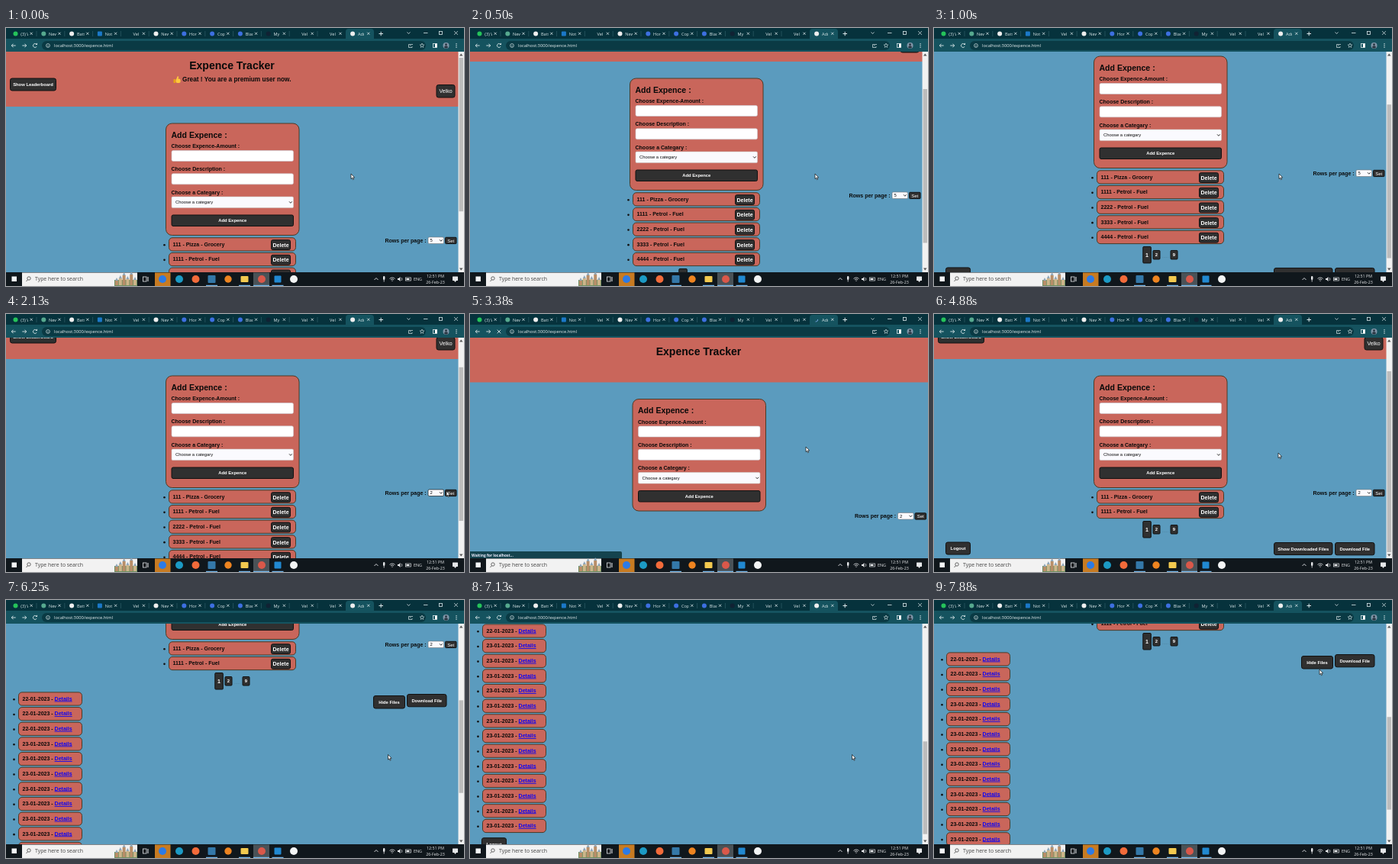
An HTML page with a canvas for the animation above (8000 ms loop, 600 by 338 pixels).

```html
<!DOCTYPE html>
<html lang="en">
<head>
<meta charset="utf-8">
<title>Expence Tracker</title>
<style>
html, body { margin: 0; width: 100%; height: 100%; overflow: hidden; background: #5b9bbe; }
canvas { display: block; width: 600px; height: 338px; }
</style>
</head>
<body>
<canvas id="stage" width="600" height="338"></canvas>
<script>
const c = document.getElementById('stage').getContext('2d');
const SANS = '"Liberation Sans", Arial, sans-serif', UI = '"Open Sans", sans-serif';
const RED = '#c9665b', BLUE = '#5b9bbe', DARK = '#303030', EDGE = '#4c3a26';
const LOOP = 8000, STEP = 125, TOP = 31, BOTTOM = 320;

// [time, value...]; equal times make a hard jump
const scrollKeys = [
  [125, 0], [500, 59], [750, 88], [1000, 88], [1250, 44], [3125, 44], [3125, 0],
  [4625, 0], [4875, 44], [5500, 44], [6250, 220], [6375, 220], [6750, 361],
  [7000, 361], [7875, 272]];
const mouseKeys = [
  [1125, 452, 191], [1500, 564, 234], [1875, 564, 234], [2125, 577, 232], [2625, 581, 234],
  [3250, 440, 174], [3625, 440, 174], [4000, 451, 182], [4875, 451, 182], [5250, 484, 305],
  [5500, 484, 305], [6250, 500.5, 202.5], [7250, 500.5, 202.5], [7875, 505, 91]];

function at(keys, t) {
  let i = keys.length - 1;
  while (i > 0 && keys[i][0] > t) i--;
  const a = keys[i], b = keys[i + 1] || a;
  const k = b[0] > a[0] ? Math.min(1, Math.max(0, (t - a[0]) / (b[0] - a[0]))) : 0;
  return a.slice(1).map((v, n) => v + (b[n + 1] - v) * k);
}

function box(x, y, w, h, r, fill, edge, line = 1) {
  c.beginPath();
  c.roundRect(x, y, w, h, r);
  c.fillStyle = fill;
  c.fill();
  if (edge) { c.strokeStyle = edge; c.lineWidth = line; c.stroke(); }
}
function dot(x, y, r, fill) {
  c.beginPath();
  c.arc(x, y, r, 0, 7);
  c.fillStyle = fill;
  c.fill();
}
function path(points, color, line = 1) {
  c.beginPath();
  for (let i = 0; i < points.length; i += 2) c.lineTo(points[i], points[i + 1]);
  c.strokeStyle = color;
  c.lineWidth = line;
  c.stroke();
}
function poly(points, fill) {
  c.beginPath();
  for (let i = 0; i < points.length; i += 2) c.lineTo(points[i], points[i + 1]);
  c.fillStyle = fill;
  c.fill();
}
function cross(x, y, r, color, line) {
  path([x - r, y - r, x + r, y + r], color, line);
  path([x - r, y + r, x + r, y - r], color, line);
}
// y is the middle of the capitals
function text(s, x, y, size, { color = '#0a0a0a', bold = 1, align = 'left', font = SANS } = {}) {
  c.font = `${bold ? 'bold ' : ''}${size}px ${font}`;
  c.textAlign = align;
  c.fillStyle = color;
  c.fillText(s, x, y + size * .36);
}
function button(s, x, y, w, h, size = 5.86, bold = 1, r = 2.5) {
  box(x, y, w, h, r, DARK, '#111');
  text(s, x + w / 2, y + h / 2, size, { color: '#fff', bold, align: 'center' });
}
function select(s, x, y, w, h, pad, edge = '#777') {
  box(x, y, w, h, 1.5, '#fafafe', edge, .6);
  text(s, x + pad, y + h / 2, 5.86, { bold: 0 });
  const m = y + h / 2;
  path([x + w - 5.5, m - 1, x + w - 3.7, m + 1, x + w - 1.9, m - 1], '#222', .9);
}
function row(x, y, w) {
  dot(x - 6, y + 1, 1.3, '#111');
  box(x, y - 8.4, w, 17.2, 4.5, RED, EDGE);
}

function form() {
  box(209.5, 125, 174.5, 146.5, 8, RED, EDGE);
  text('Add Expence :', 216.5, 140, 10.54);
  ['Choose Expence-Amount :', 'Choose Description :', 'Choose a Categary :'].forEach((s, i) => {
    const y = 160.5 + i * 30.3;
    text(s, 216.5, y - 6, 7.03);
    if (i < 2) box(217, y, 159.5, 14, 2, '#fff', '#c9c9d2', .6);
    else select('Choose a categary', 217, y, 159.5, 14.5, 5, '#ccc');
  });
  button('Add Expence', 217, 245, 159.5, 14.5, 5.86, 1, 2);
}

function page(t, scroll) {
  const loading = t >= 3125 && t < 3625, five = t < 3125, files = t >= 5500;
  const dx = loading ? 3.5 : 0, dy = loading ? -13.5 : 0;
  c.save();
  c.beginPath();
  c.rect(0, TOP, 600, BOTTOM - TOP);
  c.clip();
  c.fillStyle = BLUE;
  c.fillRect(0, TOP, 600, BOTTOM - TOP);
  c.translate(0, -scroll);

  box(0, TOP, 600, 72 + dy, 0, RED);
  text('Expence Tracker', 296 + dx, 49, 14.05, { align: 'center' });
  if (!loading) {
    box(219.5, 67, 2.5, 5, .5, '#e8a317');
    box(222.5, 66.5, 6, 5.5, 1.8, '#ffc83d');
    path([224, 67.5, 225.5, 63.5], '#ffc83d', 2);
    text('Great ! You are a premium user now.', 231, 67.5, 8.22);
    button('Show Leaderboard', 5.5, 66, 60, 16);
    button('Velko', 564, 74.5, 24, 16.5, 7.03, 0);
  }

  c.save();
  c.translate(dx, dy);
  form();
  c.translate(dx && 4, 0);
  text('Rows per page :', 496.5, 278, 7.03);
  select(t < 1750 ? '5' : '2', 553, 274, 20.5, 8.5, 2.5, t >= 1500 && five ? '#000' : '#777');
  button('Set', 575.5, 274.3, 14.5, 8.3, 5.86, 0, 1);
  c.restore();

  const rows = five ? 5 : 2, pitch = 19.65, shift = (rows - 2) * pitch;
  const bottom = (files ? 668 : 351) + shift;
  if (!loading) {
    ['111 - Pizza - Grocery', '1111 - Petrol - Fuel', '2222 - Petrol - Fuel',
     '3333 - Petrol - Fuel', '4444 - Petrol - Fuel'].slice(0, rows).forEach((s, i) => {
      const y = 283.2 + i * pitch;
      row(213.5, y, 166);
      text(s, 218.5, y, 7.03);
      button('Delete', 347.5, y - 5.5, 25, 12.8, 7.03, 1, 2);
    });
    button('1', 273.8, 315.5 + shift, 10.5, 21.5, 7, 1, 1);
    button('2', 287, 320.5 + shift, 9, 11.5, 5.86, 1, 1);
    text('.....', 303, 328 + shift, 5.86, { color: '#48748c', bold: 0, align: 'center' });
    button('9', 310, 320.5 + shift, 9, 11.5, 5.86, 1, 1);
    for (let i = 0; files && i < 16; i++) {
      const y = 349.3 + i * pitch, s = `${i < 3 ? 22 : 23}-01-2023 - `;
      row(16.5, y, 83);
      text(s, 21.5, y, 7.03);
      const x = 21.5 + c.measureText(s).width;
      text('Details', x, y, 7.03, { color: '#1408ee' });
      path([x, y + 3.6, x + c.measureText('Details').width, y + 3.6], '#1408ee', .9);
    }
    button('Logout', 15.5, bottom - 8, 32, 16);
    if (files) button('Hide Files', 481.5, 345.5, 41, 16.5);
    else button('Show Downloaded Files', 445.5, 343.5 + shift, 76.5, 16);
    button('Download File', 525.5, 343.5 + shift, 51.5, 16.3);
  }
  c.restore();

  if (loading) {
    box(0, 311, 199, 10, [0, 2, 0, 0], '#15434e');
    text('Waiting for localhost...', 2, 316, 4.9, { color: '#eef', font: UI });
  } else {
    const k = 273 / (bottom + 13 - TOP);
    box(592.5, TOP, 7.5, 289, 0, '#f1f1f1');
    box(593.5, 39 + scroll * k, 5.5, 289 * k, 0, '#bcbcbc');
    poly([594, 36.5, 598.5, 36.5, 596.2, 33.5], '#555');
    poly([594, 314.5, 598.5, 314.5, 596.2, 317.5], '#555');
  }
}

const tabs = [
  ['(3) W', '#25c35a'], ['New', '#56a98e'], ['Batt', '#eee'], ['Not', '#1b78c8', 1],
  ['Vel'], ['New', '#eee'], ['Hor', '#3d6fe0'], ['Cop', '#3d6fe0'], ['Blac', '#3d6fe0'],
  ['My', '#123'], ['Vel'], ['Vel'], ['Adı', '#eee']];

function browser(t) {
  const pale = '#dbe8ea', loading = t >= 3125 && t < 3625;
  box(0, 0, 600, 15, 0, '#06323c');
  box(0, 14, 600, 17, 0, '#15535f');
  box(445, 1, 37, 14, [4, 4, 0, 0], '#15535f');
  tabs.forEach(([s, color, square], i) => {
    const x = 12.5 + i * 36.8;
    if (loading && i === 12) {
      c.beginPath();
      c.arc(x - 1, 7.5, 2.5, t / 90, t / 90 + 2);
      c.strokeStyle = '#8ab4f8';
      c.lineWidth = .8;
      c.stroke();
    } else if (square) box(x - 3, 4.5, 6, 6, 1, color);
    else if (color) dot(x, 7.5, 3, color);
    c.save();
    c.beginPath();
    c.rect(x + 6, 0, 10.5, 15);
    c.clip();
    text(s, x + 6.8, 7.5, 5.6, { color: pale, bold: 0, font: UI });
    c.restore();
    cross(x + 20.7, 7.3, 1.6, pale, .8);
    if (i < 11) path([x + 27.5, 4, x + 27.5, 11], '#41707a', .5);
  });
  path([488.5, 7.5, 494, 7.5], pale);
  path([491.2, 4.8, 491.2, 10.2], pale);
  path([525.5, 5.5, 527.5, 7.5, 529.5, 5.5], pale, .8);
  path([547, 6.5, 552.5, 6.5], pale, .8);
  c.strokeRect(567.5, 4.5, 4, 4);
  cross(589.5, 6.5, 2.3, pale, .8);

  for (const [x, d] of [[10, -1], [24, 1]]) {
    path([x - 2.7, 23, x + 2.7, 23], pale, .9);
    path([x + d * .5, 20.7, x + d * 2.7, 23, x + d * .5, 25.3], pale, .9);
  }
  if (loading) cross(38, 23, 2.3, pale, .9);
  else {
    c.beginPath();
    c.arc(38, 23, 2.5, .5, 5.5);
    c.strokeStyle = pale;
    c.lineWidth = .9;
    c.stroke();
    poly([38.6, 22, 41, 22, 41, 19.5], pale);
  }
  box(47, 17, 503, 12, 6, '#0a3a44');
  c.beginPath();
  c.arc(55, 23, 2.4, 0, 7);
  c.strokeStyle = pale;
  c.lineWidth = .7;
  c.stroke();
  path([55, 22.6, 55, 24.4], pale, .7);
  text('localhost:3000/expence.html', 63, 22.8, 5.75, { color: '#e9f1f2', bold: 0, font: UI });
  path([530, 21.5, 527.5, 21.5, 527.5, 25.5, 532, 25.5, 532, 24], pale, .7);
  path([529.5, 23.5, 530.5, 21.5, 533, 21.5], pale, .7);
  const star = [];
  for (let i = 0; i <= 10; i++) {
    const r = i % 2 ? 1.3 : 3, a = i * Math.PI / 5;
    star.push(545 + r * Math.sin(a), 23 - r * Math.cos(a));
  }
  path(star, pale, .6);
  c.lineWidth = .8;
  c.strokeRect(559.5, 20.5, 5, 5);
  box(562, 20.5, 2.5, 5, 0, '#fff');
  dot(576.5, 23, 4, '#8196a8');
  dot(576.5, 21.7, 1.4, '#273440');
  box(574.3, 23.5, 4.4, 3, 1.3, '#273440');
  for (const y of [20.7, 23, 25.3]) dot(590, y, .7, pale);
}

function taskbar() {
  const pale = '#e6e8ea', grey = '#444';
  box(0, 320, 600, 18, 0, '#10171c');
  box(7.5, 325.5, 6.5, 6.5, 0, '#f4f6f8');
  box(21, 320.5, 151, 17.5, 0, '#f2f2f2');
  c.beginPath();
  c.arc(30, 328, 2.2, 0, 7);
  c.strokeStyle = grey;
  c.lineWidth = .8;
  c.stroke();
  path([28.5, 329.7, 26.5, 332], grey, .8);
  text('Type here to search', 38, 329, 6.9, { color: grey, bold: 0, font: UI });
  box(142, 330, 30, 8, 0, '#6e8f63');
  for (let i = 0; i < 6; i++) {
    const x = 143 + i * 4.8, h = [6, 9, 13, 8, 14, 7][i];
    box(x, 337 - h, 4, h, 0, i % 2 ? '#cdb58a' : '#b88e68');
    poly([x, 337 - h, x + 2, 333 - h, x + 4, 337 - h], '#8ea6b8');
  }
  c.strokeStyle = pale;
  c.lineWidth = .8;
  c.strokeRect(179.5, 326, 4.5, 6);
  path([186, 326, 186, 332], pale);
  box(195, 320.5, 20.5, 17.5, 0, '#c77b22');
  dot(205, 329, 5, '#2d7be5');
  box(324, 320.5, 21, 17.5, 0, '#4a5257');
  dot(227, 329, 5, '#1c9ac4');
  dot(248.5, 329, 5, '#f26b3a');
  box(264.5, 324, 10, 10, 1, '#3478a8');
  dot(291, 329, 4.7, '#ee8420');
  box(307.5, 325, 10, 8, 1, '#f2c94f');
  dot(335, 329, 5, '#d9584a');
  box(351.5, 324.5, 9, 9, 1, '#2189d1');
  dot(377, 329, 5, '#f2f4f4');
  for (const x of [262, 305, 324, 348.5]) box(x, 336.8, x === 324 ? 21 : 15, 1.2, 0, '#76b9ed');

  path([482.5, 330, 485, 327.5, 487.5, 330], pale, .9);
  box(494, 325, 2.4, 5, 1.2, pale);
  path([495.2, 330, 495.2, 332.5], pale, .8);
  for (let i = 0; i < 3; i++) {
    c.beginPath();
    c.arc(506, 332, 1 + i * 2, -2.35, -.8);
    c.strokeStyle = pale;
    c.lineWidth = .8;
    c.stroke();
  }
  poly([513, 328, 514.5, 328, 516.5, 326, 516.5, 332, 514.5, 330, 513, 330], pale);
  path([518, 327, 519, 329, 518, 331], pale, .7);
  c.lineWidth = .7;
  c.strokeRect(523.5, 327, 7, 4);
  box(524.5, 328, 4, 2, 0, pale);
  const opt = { color: pale, bold: 0, align: 'center', font: UI };
  text('ENG', 539.5, 329, 5.5, opt);
  text('12:51 PM', 562.5, 324.8, 5.3, opt);
  text('26-Feb-23', 562.5, 333, 5.3, opt);
  box(585, 325.5, 7, 5.5, .5, pale);
  poly([587, 331, 590, 331, 588.5, 333], pale);
}

function cursor(x, y) {
  const p = [0, 0, 0, 6.6, 1.5, 5.3, 2.5, 7.7, 3.6, 7.2, 2.6, 4.9, 4.6, 4.8, 0, 0];
  const q = p.map((v, i) => v + (i % 2 ? y : x));
  poly(q, '#fff');
  path(q, '#111', .7);
}

function draw(now) {
  const t = Math.floor(now % LOOP / STEP) * STEP;
  page(t, at(scrollKeys, t)[0]);
  browser(t);
  taskbar();
  cursor(...at(mouseKeys, t));
  requestAnimationFrame(draw);
}
requestAnimationFrame(draw);
</script>
</body>
</html>
```
